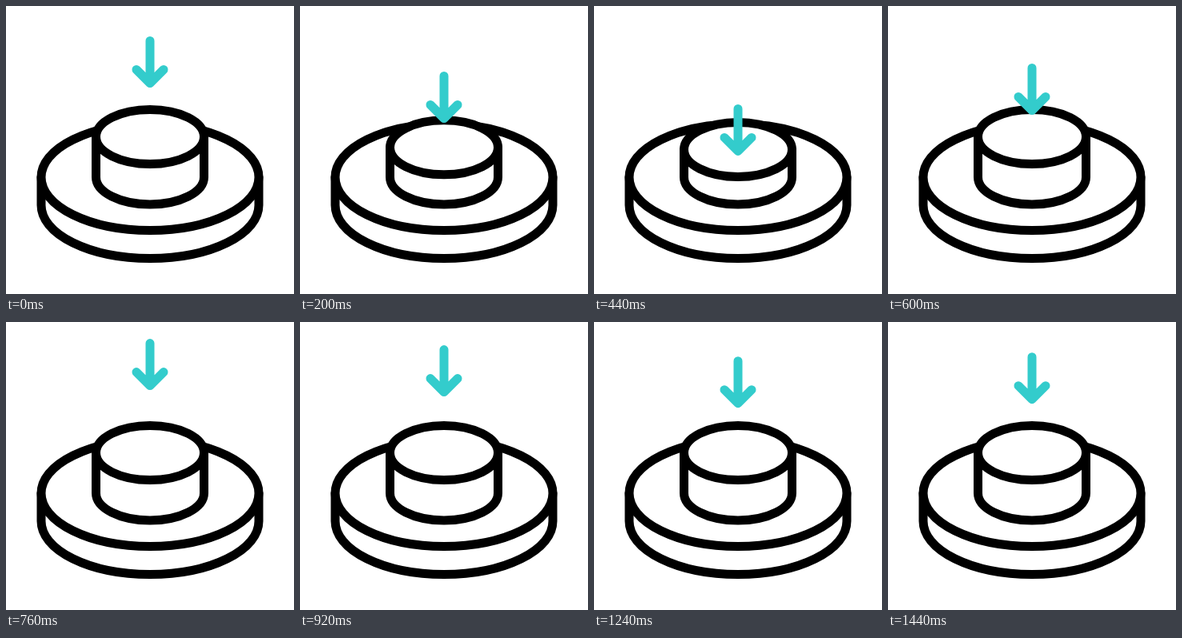
Animation, 360 px wide and 360 px high, one loop 1480 ms. Source, as an HTML page:

```html
<!DOCTYPE html>
<html lang="en">
<head>
<meta charset="utf-8">
<title>Push button</title>
<style>
  html, body { margin: 0; width: 100%; height: 100%; overflow: hidden; background: #fff; }
  svg { display: block; width: 100vw; height: 100vh; }
  path, ellipse { stroke: #000; stroke-width: 11; stroke-linecap: round; stroke-linejoin: round; fill: #fff; }
  #arrow path { stroke: #33cccc; fill: none; }
</style>
</head>
<body>
<svg viewBox="0 0 360 360">
  <path d="M44 214V249A136 66.5 0 0 0 316 249V214"/>
  <ellipse cx="180" cy="214" rx="136" ry="66.5"/>
  <path id="side"/>
  <ellipse id="cap" cx="180" cy="163.5" rx="67.5" ry="34"/>
  <g id="arrow"><path d="M180 43.5V96.5M163 79.5L180 96.5L197 79.5"/></g>
</svg>
<script>
const LOOP = 1480, STEP = 40;
const side = document.getElementById('side');
const cap = document.getElementById('cap');
const arrow = document.getElementById('arrow');

// [time in ms, downward offset], eased in and out between keys
const arrowKeys = [[0, 0], [400, 88], [800, -20], [1080, 8], [1480, 0]];
const pressKeys = [[0, 0], [320, 19.5], [380, 19.5], [600, 0], [1480, 0]];

function valueAt(keys, t) {
  const i = keys.findIndex(k => k[0] > t);
  const [t0, a] = keys[i - 1], [t1, b] = keys[i];
  const p = (t - t0) / (t1 - t0);
  return a + (b - a) * p * p * (3 - 2 * p);
}

function draw(t) {
  const top = 163.5 + valueAt(pressKeys, t);
  cap.setAttribute('cy', top);
  side.setAttribute('d', `M112.5 ${top}V214A67.5 34 0 0 0 247.5 214V${top}`);
  arrow.setAttribute('transform', `translate(0 ${valueAt(arrowKeys, t)})`);
}

const start = performance.now();
function tick() {
  const t = (performance.now() - start) % LOOP;
  draw(Math.floor(t / STEP) * STEP);
  requestAnimationFrame(tick);
}
tick();
</script>
</body>
</html>
```
